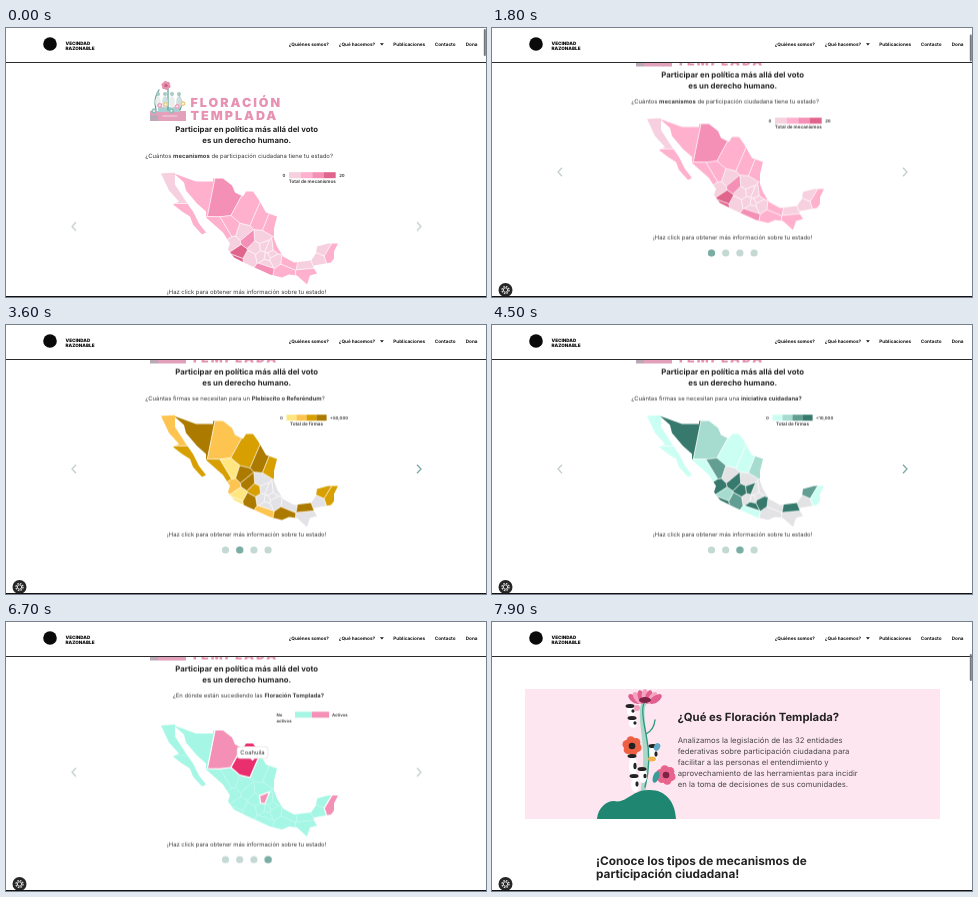
Write an HTML page that moves like this. It is 480 px wide and 269 px high and loops after 8 s.

```html
<!DOCTYPE html>
<html lang="es">
<head>
<meta charset="utf-8">
<title>Mapa de participación</title>
<style>
html, body { margin: 0; width: 100%; height: 100%; overflow: hidden; background: #fff; }
svg { display: block; width: 480px; height: 269px; font-family: Inter, "Open Sans", sans-serif; font-size: 5.9px; fill: #3a3a3a; text-rendering: geometricPrecision; }
.b { font-weight: 700; }
.nav { font-size: 4.65px; font-weight: 700; fill: #111; }
.brand { font-size: 4.6px; font-weight: 900; fill: #111; }
.title { font-size: 12.5px; font-weight: 900; letter-spacing: 2px; fill: #e792b2; }
.head { font-size: 7.75px; font-weight: 700; fill: #222; text-anchor: middle; }
.key { font-size: 4.3px; font-weight: 600; fill: #333; }
.key.b { font-size: 4.6px; }
.big { font-size: 11.3px; font-weight: 700; fill: #222; }
.more { font-size: 11.8px; }
.para { font-size: 7.73px; fill: #484848; }
.mid { text-anchor: middle; }
.chev { fill: none; stroke: #c3cfcc; stroke-width: 1.3; }

#page, #thumb, #track, #dots, #arrows, #active, #next, #gear, #bar, #map4, #tip, #map4 .COA { animation: 8s linear infinite; }
#page { animation-name: scroll; }
#thumb { animation-name: thumb; }
#bar { animation-name: bar; }
#track { animation-name: track; }
#dots { animation-name: dots; }
#arrows { animation-name: arrows; }
#active { animation-name: active; animation-timing-function: step-end; }
#next { animation-name: hover; }
#gear { animation-name: gear; animation-timing-function: step-end; }
#map4 { animation-name: fade; }
#tip { animation-name: tip; }
#map4 .COA { animation-name: pick; }

@keyframes scroll {
  0%, 15.6% { transform: translateY(0); animation-timing-function: cubic-bezier(.3,.6,.3,1); }
  22.4%, 84.4% { transform: translateY(-54.5px); animation-timing-function: cubic-bezier(.3,.5,.3,1); }
  98.5%, 100% { transform: translateY(-305px); }
}
@keyframes thumb {
  0%, 15.6% { transform: translateY(0); animation-timing-function: cubic-bezier(.3,.6,.3,1); }
  22.4%, 84.4% { transform: translateY(5.5px); animation-timing-function: cubic-bezier(.3,.5,.3,1); }
  98.5%, 100% { transform: translateY(31px); }
}
@keyframes bar {
  0%, 32.5% { opacity: 1; }
  35%, 84.3% { opacity: 0; }
  85%, 100% { opacity: 1; }
}
@keyframes track {
  0%, 36.9% { transform: translateX(0); animation-timing-function: ease; }
  43.5%, 48.1% { transform: translateX(-480px); animation-timing-function: ease; }
  54.8%, 59.4% { transform: translateX(-960px); animation-timing-function: ease; }
  66%, 100% { transform: translateX(-1440px); }
}
@keyframes dots {
  0%, 59.4% { transform: translateY(0); animation-timing-function: ease; }
  66%, 100% { transform: translateY(12.6px); }
}
@keyframes arrows {
  0%, 59.4% { transform: translateY(0); animation-timing-function: ease; }
  66%, 100% { transform: translateY(6.3px); }
}
@keyframes active {
  0% { transform: translateX(0); }
  37.5% { transform: translateX(14.2px); }
  48.8% { transform: translateX(28.4px); }
  60%, 100% { transform: translateX(42.6px); }
}
@keyframes hover {
  0%, 32.5%, 74%, 100% { stroke: #c3cfcc; }
  35%, 71% { stroke: #79aca3; }
}
@keyframes gear { 0% { opacity: 0; } 12.5%, 100% { opacity: 1; } }
@keyframes fade { 0%, 59.4% { opacity: .4; } 76%, 100% { opacity: 1; } }
@keyframes tip { 0%, 77.5%, 86%, 100% { opacity: 0; } 79%, 84.8% { opacity: 1; } }
@keyframes pick { 0%, 77.5%, 86%, 100% { fill: #f48fb5; } 79%, 84.8% { fill: #ea2f6f; } }
</style>
</head>
<body>
<svg viewBox="0 0 480 269">
  <defs>
    <clipPath id="main"><path d="M13 1 35 9H52V6H62L71 13 74 20 82 24 85 19H92L97 26 105 40 116 44 113 56V66L116 74 122 84 133 90 150 88 155 81 156 74 167 71H177L173 79V86L170 90 153 93V96L156 101 149 103 146 112 136 103 128 102 121 105 109 102 87 92 73 85 67 77 69 71 62 60 45 45V39L36 31 25 18 23 10z"/></clipPath>
    <clipPath id="baja"><path d="M0 1 14 0V12L25 29 32 39 38 51 45 60 41 62 32 52 29 44 21 39 12 32 18 29 8 18z"/></clipPath>
  </defs>

  <g id="page">
    <g id="art"></g>
    <text class="title" x="184.5" y="78.5">FLORACIÓN</text>
    <text class="title" x="184.5" y="91.5">TEMPLADA</text>
    <g transform="translate(0 54.5)">
      <text class="head" x="240.7" y="49.3">Participar en política más allá del voto</text>
      <text class="head" x="240.7" y="60.3">es un derecho humano.</text>
      <g id="track"></g>
      <g id="arrows">
        <path class="chev" d="M70 139.800 66 144 70 148.200"/>
        <path class="chev" id="next" d="M411 139.800 415 144 411 148.200"/>
      </g>
      <g id="dots" fill="#c5d9d4"></g>
    </g>
    <g transform="translate(0 305)">
      <path d="M33 67H448V197H33z" fill="#fee6f0"/>
      <g id="garden"></g>
      <text class="big" x="185.5" y="98.5">¿Qué es Floración Templada?</text>
      <g class="para" id="para"></g>
      <text class="big more" x="104" y="243">¡Conoce los tipos de mecanismos de</text>
      <text class="big more" x="104" y="256.3">participación ciudadana!</text>
    </g>
  </g>

  <path d="M0 0H480V35H0z" fill="#fff"/>
  <path d="M0 34H480V35H0z" fill="#2a2a2a"/>
  <circle cx="44" cy="16" r="6.8" fill="#0a0a0a"/>
  <text class="brand" x="59.5" y="17">VECINDAD</text>
  <text class="brand" x="59.5" y="22.3">RAZONABLE</text>
  <g class="nav">
    <text x="282.7" y="17.6">¿Quiénes somos?</text>
    <text x="332.8" y="17.6">¿Qué hacemos?</text>
    <path d="M374 15.200H377.800L375.900 17.400z"/>
    <text x="387.3" y="17.6">Publicaciones</text>
    <text x="428.8" y="17.6">Contacto</text>
    <text x="459.7" y="17.6">Dona</text>
  </g>
  <g id="bar"><rect id="thumb" x="477.8" y="1" width="2" height="27" rx="1" fill="#777"/></g>
  <g id="gear" fill="none" stroke="#ddd">
    <circle cx="13.5" cy="262" r="7" fill="#262626" stroke="none"/>
    <circle cx="13.5" cy="262" r="3.500" stroke-width="1.3" stroke-dasharray="1.6 1.15"/>
    <circle cx="13.5" cy="262" r="2.200"/>
  </g>
  <path d="M0 268H480V269H0z" fill="#111"/>
</svg>
<script>
const $ = id => document.getElementById(id);
const range = n => [...Array(n).keys()];

// one centre per state; borders follow from the distances between centres
const centres = {
  baja: 'BCN 20 16 BCS 20 46',
  main: 'SON 36 18 CHH 66 24 COA 88 36 NLE 102 42 TAM 112 46 SIN 65 60 DUR 70 57 ZAC 82 61 ' +
    'SLP 100 66 NAY 72 71 JAL 78 80 AGS 87 67 GUA 95 75 QUE 103 74 HID 108 76 VER 116 75 VER 128 88 ' +
    'COL 75 88 MIC 89 86 MEX 101 84 CMX 106 85 MOR 105 90 PUE 113 86 TLA 111 82 GRO 103 96 ' +
    'OAX 123 100 TAB 145 91 CHP 146 102 CAM 156 87 YUC 161 76 ROO 171 82'
};

// northern states reach further than southern ones
const dist = (p, s) => (p[0] - s.x) ** 2 + (p[1] - s.y) ** 2 - (s.y < 50 ? 260 : 80);

function cell(s, seeds) {
  let poly = [[-9, -9], [190, -9], [190, 125], [-9, 125]];
  for (const o of seeds) {
    if (o === s) continue;
    const side = p => dist(p, s) - dist(p, o);
    poly = poly.flatMap((p, i) => {
      const q = poly[(i + 1) % poly.length], a = side(p), b = side(q), t = a / (a - b);
      const cut = [p[0] + t * (q[0] - p[0]), p[1] + t * (q[1] - p[1])];
      return [...(a <= 0 ? [p] : []), ...(a * b < 0 ? [cut] : [])];
    });
  }
  return 'M' + poly.map(p => p.map(v => v.toFixed(1)).join(' ')).join('L') + 'z';
}

const lands = Object.entries(centres).map(([land, list]) => {
  const seeds = [...list.matchAll(/(\w+) (\d+) (\d+)/g)].map(m => ({ code: m[1], x: +m[2], y: +m[3] }));
  return { land, states: seeds.map(s => ({ code: s.code, d: cell(s, seeds) })) };
});

// groups: colour -> codes of the states that differ from the base colour
function map(y, base, groups, line = '#fff', id = '', width = .5) {
  const colour = s => Object.keys(groups).find(c => groups[c].includes(s.code)) || base;
  const shape = s => {
    const c = colour(s), plain = c === base;
    return `<path class="${s.code}" d="${s.d}" fill="${c}" stroke="${plain ? line : '#fff'}" stroke-width="${plain ? .5 : width}"/>`;
  };
  const parts = lands.map(({ land, states }) => `<g clip-path="url(#${land})">` +
    [...states].sort((a, b) => (colour(a) !== base) - (colour(b) !== base)).map(shape).join('') + '</g>');
  return `<g transform="translate(155 ${y})"><g id="${id}" stroke-linejoin="round">${parts.join('')}</g></g>`;
}

const text = (x, y, s, c = '') => `<text x="${x}" y="${y}" class="${c}">${s}</text>`;
const bold = s => `<tspan class="b">${s}</tspan>`;
const ask = (s, x = 139.3) => text(x, 75.8, s);
const hint = y => text(240.7, y, '¡Haz click para obtener más información sobre tu estado!', 'mid');
const boxes = (x, w, colours) => colours.map((c, i) =>
  `<rect x="${x + i * w}" y="89.7" width="${w + .1}" height="6" fill="${c}"/>`).join('');

function legend(x, w, colours, max, label) {
  return text(x - 6.6, 94.2, '0', 'key') + boxes(x, w / 4, colours) +
    text(x + w + 3.6, 94.2, max, 'key') + text(x + w / 2, 100.4, label, 'key b mid');
}

const pink = ['#f6d0de', '#ffb0cd', '#f48fb5', '#e0658d'];
const gold = ['#ffe680', '#fdc54f', '#d79f00', '#ad7a00'];
const teal = ['#ccfff3', '#a5dccf', '#629f92', '#377a6d'];

const slides = [
  ask(`¿Cuántos ${bold('mecanismos')} de participación ciudadana tiene tu estado?`) +
  legend(283, 46.6, pink, '20', 'Total de mecanismos') +
  map(90, pink[0], {
    [pink[1]]: 'BCS SON COA NLE TAM SIN DUR VER CHP ROO OAX',
    [pink[2]]: 'CHH GRO AGS',
    [pink[3]]: 'JAL COL'
  }) + hint(211.8),

  ask(`¿Cuántas firmas se necesitan para un ${bold('Plebiscito o Referéndum')}?`) +
  legend(280.5, 40, gold, '+50,000', 'Total de firmas') +
  map(90, '#e3e3e7', {
    [gold[0]]: 'DUR JAL COL',
    [gold[1]]: 'BCN CHH GRO NAY',
    [gold[2]]: 'BCS SIN COA TAM YUC ROO GUA',
    [gold[3]]: 'SON NLE ZAC MIC OAX TAB AGS'
  }) + hint(211.8),

  ask(`¿Cuántas firmas se necesitan para una ${bold('iniciativa cuidadana?')}`) +
  legend(280.5, 40, teal, '&lt;10,000', 'Total de firmas') +
  map(90, '#e3e3e5', {
    [teal[0]]: 'BCN BCS COA NLE SIN GRO ROO',
    [teal[1]]: 'CHH TAM JAL',
    [teal[2]]: 'DUR MIC YUC',
    [teal[3]]: 'SON NAY COL GUA QUE PUE MOR TAB AGS'
  }) + hint(211.8),

  ask(`¿En dónde están sucediendo las ${bold('Floración Templada?')}`, 166.8) +
  text(270.5, 94.6, 'No', 'key') + text(270.5, 100.6, 'activos', 'key') +
  boxes(289, 17, ['#a5f6e5', '#f48fb5']) + text(326, 94.6, 'Activos', 'key') +
  map(102.5, '#a5f6e5', { '#f48fb5': 'CHH COA QUE ROO' }, '#c4fbef', 'map4', 1.2) + hint(224.6) +
  `<g id="tip"><g fill="#fff" stroke="#d8d8d8" stroke-width=".6"><rect x="231" y="124.5" width="31" height="12" rx="3"/></g>
   <path d="M244 136H249L246.500 139z" fill="#fff"/>${text(246.5, 132.7, 'Coahuila', 'mid')}</g>`
];
$('track').innerHTML = slides.map((s, i) => `<g transform="translate(${i * 480})">${s}</g>`).join('');

const dot = (x, y, rx, ry, fill, turn = 0) =>
  `<ellipse cx="${x}" cy="${y}" rx="${rx}" ry="${ry}" fill="${fill}" transform="rotate(${turn} ${x} ${y})"/>`;
const ball = (x, y, r, fill, attr = '') => `<circle cx="${x}" cy="${y}" r="${r}" fill="${fill}" ${attr}/>`;

$('dots').innerHTML = range(4).map(i => ball(219.5 + 14.2 * i, 225, 3.6, '#c5d9d4')).join('') +
  ball(219.5, 225, 3.6, '#7aaea5', 'id="active"');

$('para').innerHTML = [
  'Analizamos la legislación de las 32 entidades',
  'federativas sobre participación ciudadana para',
  'facilitar a las personas el entendimiento y',
  'aprovechamiento de las herramientas para incidir',
  'en la toma de decisiones de sus comunidades.'
].map((s, i) => text(185.7, 120.6 + i * 11.1, s)).join('');

const flower = (x, y, r, fill, heart) => range(6).map(i => {
  const a = i * Math.PI / 3 + .3;
  return ball(x + r * .58 * Math.cos(a), y + r * .58 * Math.sin(a), r * .45, fill);
}).join('') + ball(x, y, r * .35, heart);
const stroke = (d, c, w) => `<path d="${d}" fill="none" stroke="${c}" stroke-width="${w}" stroke-linecap="round"/>`;
// white figure with dark patches
const pet = (x, y, h) => dot(x, y, 4, h, '#fff') + dot(x - 1, y - h, 4.5, 2, '#222') + dot(x + 2, y, 1.6, h / 3, '#222');

$('art').innerHTML =
  '<path d="M144 83H180V93H144z" fill="#e3a0bb"/><path d="M144 87H152V93H144z" fill="#b9a9b7"/><path d="M152 79H174V84H152z" fill="#a9cfd2"/>' +
  stroke('M150 82Q147 70 153 62M162 82V60M174 82Q178 74 172 66', '#5c9d93', 1.2) +
  range(4).map(i => dot(152 + i * 7, 74, 2.8, 6, i % 2 ? '#cfe0e2' : '#e9eeec') + ball(152 + i * 7, 66, 2, '#a8c9c4')).join('') +
  flower(160, 57.5, 4.5, '#e88fae', '#c75b80') +
  range(6).map(i => flower(148 + i * 5.8, 79 + 4 * Math.cos(i * 2), 2.6, ['#8bbfb4', '#efa3bf', '#e9cf8c'][i % 3], '#fff')).join('') +
  stroke('M157 88H171', '#f6d5e2', 1);

$('garden').innerHTML =
  stroke('M151 170Q156 140 152 112T153 80', '#a9d8c8', 5) +
  stroke('M153 165Q160 140 154 112T153 80M154 112Q162 108 163 98', '#2c967f', 1.3) +
  '<path d="M105 197C106 186 114 179 122 179 134 182 140 168 156 168 172 167 183 178 184 197z" fill="#1f8672"/>' +
  range(7).map(i => dot(153 + (i - 3) * 3.6, 74 + Math.abs(i - 3), 3.4, 7, i % 2 ? '#f5a3c0' : '#e2608f', (i - 3) * 18)).join('') +
  dot(153, 78, 6, 3, '#7d2346') + pet(139, 89, 5) + ball(145, 86, 3, '#f3a0bd') + pet(141, 101, 5) +
  flower(140, 124, 9.5, '#ee5f43', '#222') +
  pet(141, 144, 10) + pet(143, 162, 8) + pet(162, 132, 8) + pet(151, 154, 7) +
  dot(160, 137, 4, 2.5, '#f4b04d') + dot(165, 125, 3, 4, '#5fa9c4', 30) +
  flower(174, 153, 9.5, '#e8648d', '#7d2346') + dot(164, 155, 3, 6, '#3a9c98', 20);
</script>
</body>
</html>
```
